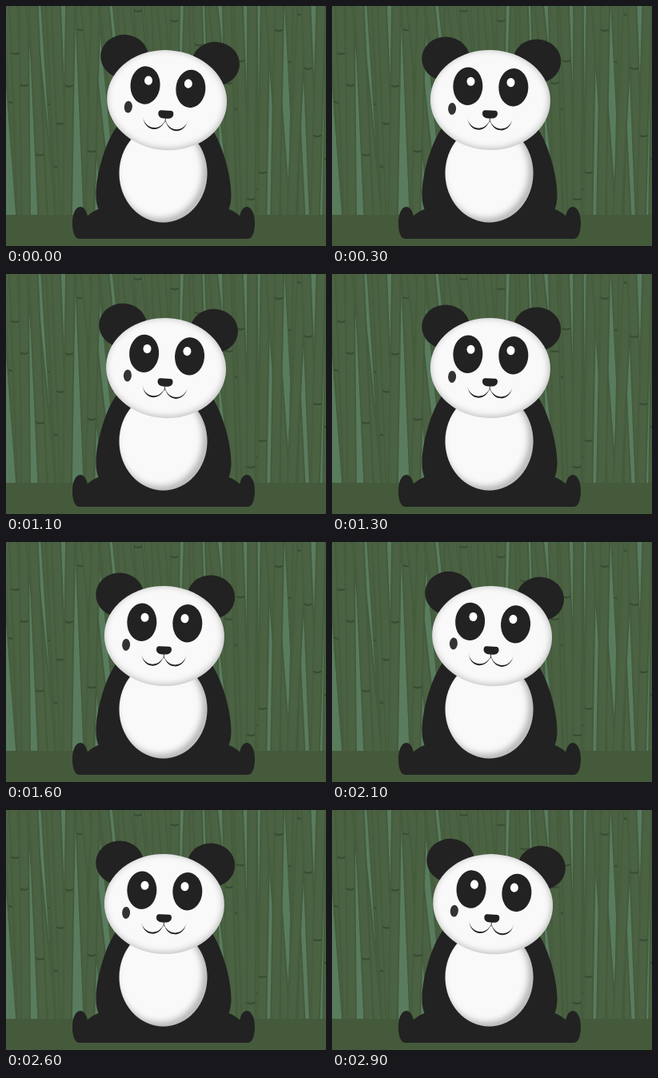
Animation, 400 px wide and 300 px high, one loop 3000 ms. Source, as an HTML page:

```html
<!DOCTYPE html>
<html lang="en">
<head>
<meta charset="utf-8">
<title>Panda</title>
<style>
  html, body { margin: 0; width: 100%; height: 100%; overflow: hidden; background: #597c5f; }
  svg { display: block; width: 400px; height: 300px; }
</style>
</head>
<body>
<svg viewBox="0 0 400 300">
  <defs>
    <linearGradient id="cane">
      <stop offset="0" stop-color="#435a3b"/>
      <stop offset=".25" stop-color="#4a6142"/>
      <stop offset=".75" stop-color="#4b6343"/>
      <stop offset="1" stop-color="#41573a"/>
    </linearGradient>
    <filter id="soft" x="-20%" y="-20%" width="140%" height="140%">
      <feGaussianBlur stdDeviation="4"/>
    </filter>
    <clipPath id="bellyClip"><ellipse cx="196.500" cy="209" rx="55" ry="61.500"/></clipPath>
    <clipPath id="headClip"><ellipse cy="-62" rx="75" ry="62.500"/></clipPath>
  </defs>

  <rect width="400" height="300" fill="#597c5f"/>
  <g id="forest"></g>
  <rect y="261" width="400" height="39" fill="#455a3b"/>

  <g fill="#222">
    <path id="half" d="M198 140H150C130 150 112.500 205 112.500 236Q112.500 246 115.500 254Q108 256.500 102 262.500
      C100 255 97 251 93 251C87 251 83 260 83 271C83 280 85 291 92 291H198Z"/>
    <use href="#half" transform="matrix(-1 0 0 1 394 0)"/>
  </g>

  <g clip-path="url(#bellyClip)">
    <rect x="140" y="146" width="114" height="126" fill="#f9f9f9"/>
    <ellipse cx="192" cy="205" rx="59" ry="65.500" fill="none" stroke="#000" stroke-opacity=".36" stroke-width="8" filter="url(#soft)"/>
  </g>

  <!-- The head is drawn around the point where it meets the body. -->
  <g id="head">
    <g fill="#222">
      <ellipse cx="-57" cy="-112" rx="30" ry="27.500"/>
      <ellipse cx="57" cy="-112" rx="30" ry="27.500"/>
    </g>
    <g clip-path="url(#headClip)">
      <rect x="-76" y="-126" width="152" height="128" fill="#f9f9f9"/>
      <ellipse cx="-1" cy="-63" rx="79" ry="66.500" fill="none" stroke="#000" stroke-opacity=".3" stroke-width="8" filter="url(#soft)"/>
    </g>
    <g fill="#222">
      <ellipse cx="-28.500" cy="-78.500" rx="18.500" ry="23.700"/>
      <ellipse cx="28.500" cy="-78.500" rx="18.500" ry="23.700"/>
      <path d="M-6 -49H6Q9.500 -49 9.500 -45C9.500 -41 6 -39 2 -39H-2C-6 -39 -9.500 -41 -9.500 -45Q-9.500 -49 -6 -49Z"/>
      <path id="smile" d="M-28 -40.500A14 16 0 0 0 0 -40.500A14 14 0 0 1 -28 -40.500Z"/>
      <use href="#smile" x="28"/>
      <rect x="-.4" y="-40" width=".8" height="6"/>
    </g>
    <ellipse cx="-47.500" cy="-49.800" rx="5" ry="7.500" fill="#333"/>
    <g fill="#fff">
      <ellipse cx="-25" cy="-84.600" rx="5" ry="5.600"/>
      <ellipse cx="25" cy="-84.600" rx="5" ry="5.600"/>
    </g>
  </g>
</svg>
<script>
  const GROUND = 261, CANES = 42;

  let seed = 11;
  function random() {
    seed = (seed * 16807) % 2147483647;
    return seed / 2147483647;
  }
  const spread = amount => (random() - 0.5) * amount;

  // Evenly planted canes with a random lean and one joint each.
  function cane(i) {
    const part = i / (CANES - 1);
    const top = 400 * part + spread(12);
    const foot = 18 + 384 * part + spread(34);
    const joint = 5 + 245 * random();
    return `<g transform="matrix(1 0 ${(foot - top) / GROUND} 1 ${top} 0)">
      <rect x="-6.5" y="-2" width="13" height="266" fill="url(#cane)"/>
      <path d="M-5 ${joint}q5 3 10 0" fill="none" stroke="#374c32" stroke-width="2"/></g>`;
  }

  for (let i = 0; i < 5; i++) random();
  document.getElementById('forest').innerHTML =
    Array.from({ length: CANES }, (_, i) => cane(i)).join('');

  const head = document.getElementById('head');
  const LOOP = 3000, STEP = 100, SWAY = 1000, TILT = 5;

  // The head rocks at constant speed between 0 and TILT degrees, in held steps.
  function draw(ms) {
    const held = Math.floor((ms % LOOP) / STEP) * STEP;
    const phase = (held + STEP / 2) % SWAY / SWAY;
    const angle = TILT * Math.abs(1 - 2 * phase);
    head.setAttribute('transform', `translate(196.3 179.5) rotate(${angle})`);
  }

  const start = performance.now();
  function tick() {
    draw(performance.now() - start);
    requestAnimationFrame(tick);
  }
  tick();
</script>
</body>
</html>
```
